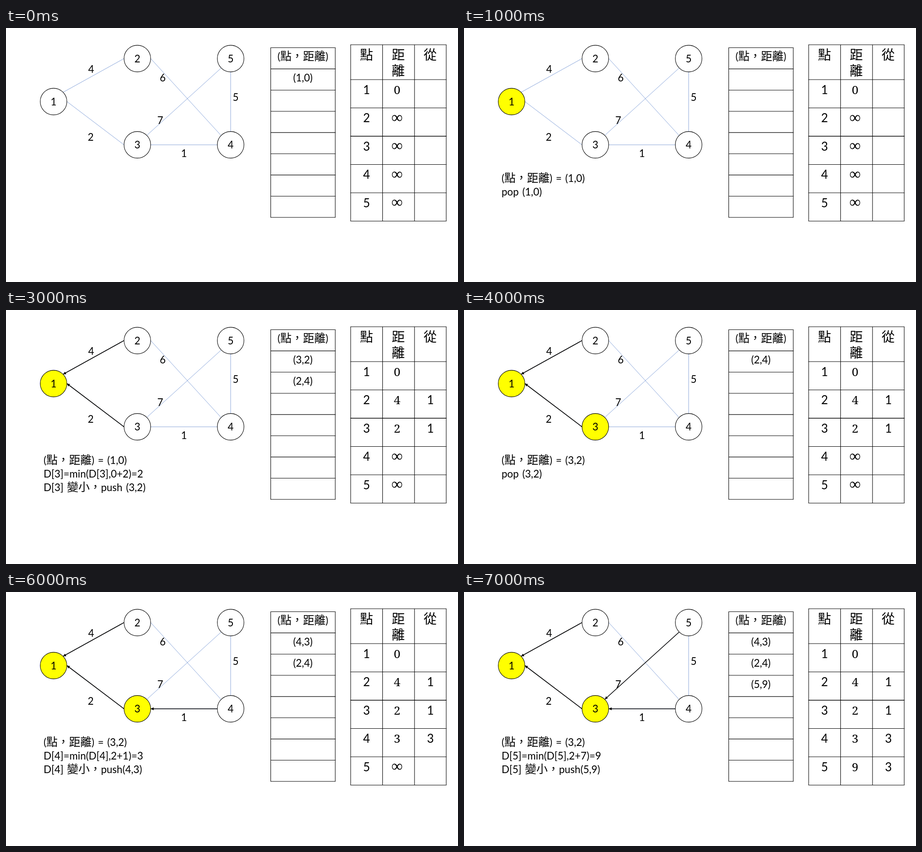
An HTML page that plays this animation: 998x561 px, repeating every 8000 ms.

```html
<!DOCTYPE html>
<html lang="zh-Hant">
<head>
<meta charset="utf-8">
<title>最短路徑</title>
<style>
  html, body { margin: 0; width: 100%; height: 100%; overflow: hidden; background: #fff; }
  svg { display: block; width: 100%; height: 100%; }
  text { font: 22.5px Lato, sans-serif; word-spacing: 2px; white-space: pre; }
  .mid { text-anchor: middle; }
  text.big { font-size: 26.2px; }
  text.math { font: 26px "Noto Serif", serif; }
  text.inf { font: 35px "Liberation Serif", serif; }
  .cjk { font: 300 25px "Noto Sans CJK TC", sans-serif; }
  .big .cjk { font-size: 29px; }
  .edge { stroke: #4472c4; stroke-width: .65; }
  .arrow { stroke: #000; stroke-width: 1.6; }
  .ring, .grid { fill: none; stroke: #000; stroke-width: 1.1; }
  .bold { stroke: #000; stroke-width: 1.6; }
  .done { fill: #ff0; }
  .scene { visibility: hidden; animation: show 8s step-end infinite; }
  @keyframes show {
    0% { visibility: visible; }
    12.5%, 100% { visibility: hidden; }
  }
</style>
</head>
<body>
<svg id="stage" viewBox="0 0 998 561">
  <defs>
    <marker id="tip" markerUnits="userSpaceOnUse" markerWidth="7" markerHeight="7" refX="6.5" refY="3.25" orient="auto">
      <path d="M0 0L6.5 3.25L0 6.5z"/>
    </marker>
  </defs>
</svg>
<script>
const stage = document.getElementById('stage');
const nodes = { 1: [105, 162.5], 2: [290, 67.5], 3: [290, 258], 4: [496, 258], 5: [496, 67.5] };
// child, parent, line ends, weight, label centre
const edges = [
  [2, 1, 260.5, 67.5, 126, 142, 4, 188, 91],
  [3, 1, 260.5, 258, 134.5, 162.5, 2, 187, 241],
  [4, 2, 475, 237.5, 319.5, 67.5, 6, 346, 110],
  [5, 3, 475, 88.5, 311, 237, 7, 340.5, 204],
  [4, 3, 466.5, 258, 319.5, 258, 1, 393, 277],
  [5, 4, 496, 97, 496, 228.5, 5, 507, 153]
];
const queueY = i => 43.5 + i * 46.85;
const rowY = i => 114 + i * 62.5;

function add(parent, tag, attrs) {
  const el = document.createElementNS('http://www.w3.org/2000/svg', tag);
  for (const k in attrs) el.setAttribute(k, attrs[k]);
  return parent.appendChild(el);
}

// Chinese runs get their own face and size
function write(parent, str, x, y, cls = 'mid') {
  const el = add(parent, 'text', { x, y, class: cls });
  for (const run of String(str).match(/[\u3000-\uffef]+|[^\u3000-\uffef]+/g)) {
    if (run >= '\u3000') add(el, 'tspan', { class: 'cjk' }).textContent = run;
    else el.append(run);
  }
}

function line(parent, cls, x1, y1, x2, y2) {
  return add(parent, 'line', { class: cls, x1, y1, x2, y2 });
}

function drawBase() {
  for (const [, , x1, y1, x2, y2, w, lx, ly] of edges) {
    line(stage, 'edge', x1, y1, x2, y2);
    write(stage, w, lx, ly + 8);
  }
  for (let i = 0; i < 9; i++) line(stage, 'grid', 584, queueY(i), 727.5, queueY(i));
  for (const x of [584.5, 727]) line(stage, 'grid', x, queueY(0), x, queueY(8));
  write(stage, '(點，距離)', 655.5, 71);

  for (const x of [761, 831.5, 902, 972]) line(stage, 'grid', x, 37, x, 426.5);
  for (const y of [37, 114, 176.5, 239, 301.5, 364, 426.5])
    line(stage, y === 239 ? 'bold' : 'grid', 760.5, y, 972.5, y);
  write(stage, '點', 796, 70, 'mid big');
  write(stage, '距', 866, 70, 'mid big');
  write(stage, '離', 866, 105, 'mid big');
  write(stage, '從', 936.5, 70, 'mid big');
  for (let v = 1; v <= 5; v++) write(stage, v, 796, rowY(v - 1) + 31.5, 'mid big');
}

function drawNodes() {
  for (const v in nodes) {
    const [cx, cy] = nodes[v];
    add(stage, 'circle', { class: 'ring', cx, cy, r: 29.4 });
    write(stage, v, cx, cy + 8);
  }
}

const dist = { 1: 0, 2: '∞', 3: '∞', 4: '∞', 5: '∞' };
const from = {}, done = [];
let queue = [[1, 0]], cur, notes = [];

function pop() {
  cur = queue.shift();
  done.push(cur[0]);
  notes = [`pop (${cur})`];
}

function relax(v, w, gap = '') {
  const d = cur[1] + w;
  dist[v] = d;
  from[v] = cur[0];
  queue.push([v, d]);
  queue.sort((a, b) => a[1] - b[1]);
  notes = [`D[${v}]=min(D[${v}],${cur[1]}+${w})=${d}`, `D[${v}] 變小，push${gap}(${v},${d})`];
}

const steps = [
  () => {},
  pop,
  () => relax(2, 4, ' '),
  () => relax(3, 2, ' '),
  pop,
  () => { notes = ['D[1]=min(D[1],2+2)=2', 'D[1] 不變']; },
  () => relax(4, 1),
  () => relax(5, 7)
];

function drawScene(i) {
  const g = add(stage, 'g', { class: 'scene', style: `animation-delay:${i - steps.length}s` });
  for (const v of done) add(g, 'circle', { class: 'done', cx: nodes[v][0], cy: nodes[v][1], r: 29.4 });
  for (const [child, parent, ...ends] of edges)
    if (from[child] === parent) line(g, 'arrow', ...ends.slice(0, 4)).setAttribute('marker-end', 'url(#tip)');
  queue.forEach((q, n) => write(g, `(${q})`, 655.5, queueY(n + 1) + 27.5));
  for (let v = 1; v <= 5; v++) {
    const y = rowY(v - 1) + 31.5, inf = dist[v] === '∞';
    write(g, dist[v], 863.5, inf ? y + .5 : y, inf ? 'mid inf' : 'mid math');
    if (from[v]) write(g, from[v], 937, y, 'mid big');
  }
  if (cur) [`(點，距離) = (${cur})`, ...notes].forEach((s, n) => write(g, s, 83, 339.5 + n * 30, ''));
}

drawBase();
steps.forEach((step, i) => {
  step();
  drawScene(i);
});
drawNodes();
</script>
</body>
</html>
```
